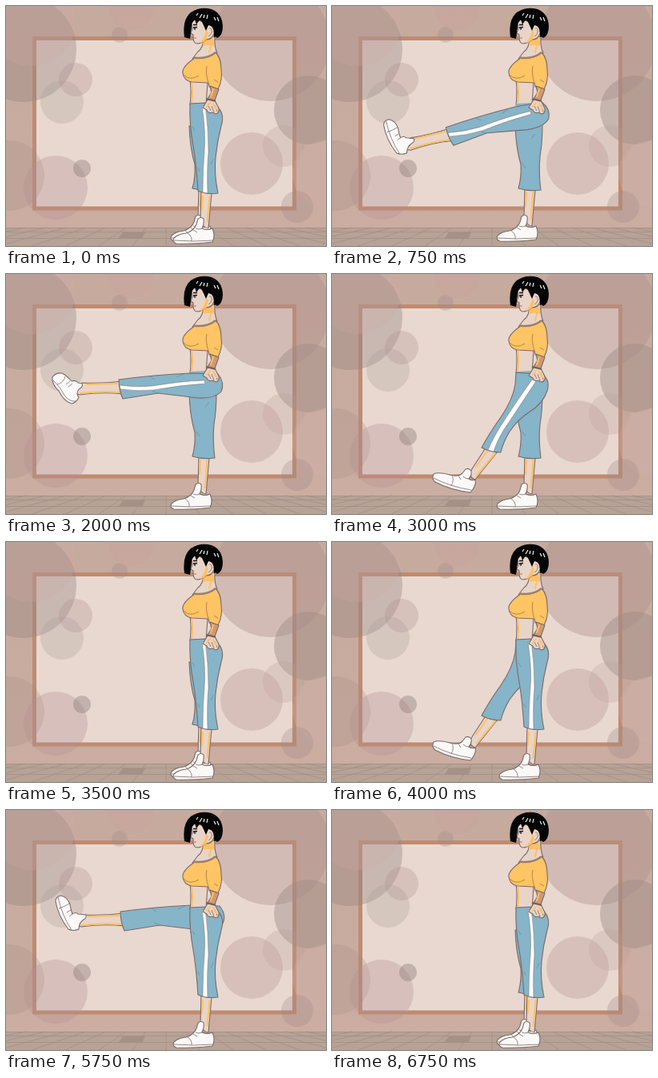
Recreate the animation shown at these times as an HTML page. Size 400 by 300 pixels, loop 7000 ms.

```html
<!DOCTYPE html>
<html lang="en">
<head>
<meta charset="utf-8">
<title>Standing leg raise</title>
<style>
html, body { margin: 0; width: 100%; height: 100%; overflow: hidden; background: #c6aa9f; }
svg { display: block; width: 100vw; height: 100vh; }
.line { stroke: #7b6a65; stroke-width: 1.1; stroke-linejoin: round; stroke-linecap: round; }
.pants { fill: #86b4c8; }
.skin { fill: #e9d4c8; }
.shoe { fill: #fbf9f8; }
.shade { fill: none; stroke: #ffc066; stroke-width: 2; stroke-linecap: round; }
.tint { fill: #ffc066; }
.thin { fill: none; stroke: #7b6a65; stroke-width: .8; }
.stripe { fill: #fff; stroke: #7b6a65; stroke-width: .5; }
.crease { fill: none; stroke: #6a92a4; stroke-width: .8; }
</style>
</head>
<body>
<svg viewBox="0 0 400 300" preserveAspectRatio="none">
  <defs>
    <linearGradient id="wall" x1="0" y1="0" x2="0" y2="1">
      <stop offset="0" stop-color="#c6aa9e"/>
      <stop offset="1" stop-color="#cbada1"/>
    </linearGradient>

    <g id="shoeFlat">
      <path class="shoe line" d="M237 263Q241 260 244 263Q245 269 242 275Q249 278 255 275Q259 284 255 292Q230 295 210 294Q204 292 207 287Q212 282 222 281Q232 278 235 270Z"/>
      <path class="thin" d="M207 290Q230 292 256 290M224 281Q230 285 229 291M242 275Q238 277 234 275M231 277L236 280"/>
    </g>

    <g id="shoeLow">
      <path class="shoe line" d="M167 244Q171 242 174 246Q175 252 171 256Q175 259 179 257Q181 264 173 273Q148 270 129 260Q124 256 127 250Q133 247 147 251Q158 254 163 249Z"/>
      <path class="thin" d="M127 255Q148 266 174 270M150 251Q153 258 149 265M171 256Q167 256 164 253M158 252L161 257"/>
    </g>

    <g id="lowLeg">
      <path class="skin line" d="M193 216L176 242L172 249Q174 256 179 257L207 222Z"/>
      <path class="shade" d="M204 224L181 252M194 221L180 241"/>
      <use href="#shoeLow"/>
      <path class="pants line" d="M230 123L229 138Q226 157 211 179Q196 200 187 217Q198 223 211 223Q214 210 222 197Q232 182 246 173Q264 162 269 146Q273 134 264 126Z"/>
    </g>
    <path id="lowStripe" class="stripe" d="M250 132Q232 157 216 182Q202 203 195 220L202 222Q208 203 222 184Q239 158 255 134Z"/>

    <g id="upLeg">
      <path class="skin line" d="M145 134Q122 137 95 136L84 148L92 151Q120 147 146 150Z"/>
      <path class="shade" d="M143 148Q120 146 93 149M139 137L101 138"/>
      <path class="pants line" d="M231 124Q185 126 141 132Q141 145 146 156Q165 153 190 149Q216 152 240 155Q261 156 269 147Q274 136 265 125Z"/>
      <path class="crease" d="M180 128L186 132M190 149L183 146M222 125L213 129"/>
    </g>
    <path id="upStripe" class="stripe" d="M142 139Q162 142 183 140Q218 134 248 133L249 137Q216 139 185 145Q163 147 143 144Z"/>

    <g id="shoeFlex">
      <path class="shoe line" d="M81 135Q85 132 88 135L98 136Q99 140 95 142Q89 146 89 154Q82 157 76 154Q63 137 60 119Q60 113 67 112Q75 114 78 123Q79 130 81 135Z"/>
      <path class="thin" d="M63 114Q68 137 80 155M64 128Q71 126 77 122M79 130L74 133M81 135L77 138"/>
    </g>

    <g id="shoePoint">
      <path class="shoe line" d="M82 134Q87 132 90 136L95 137Q97 141 91 144Q87 149 91 154Q88 161 82 162Q72 159 66 146Q57 138 58 129Q62 123 70 124Q76 127 82 134Z"/>
      <path class="thin" d="M59 133Q68 141 74 153Q80 160 88 159M64 138Q72 136 74 128M80 134L75 138M83 137L78 141"/>
    </g>
  </defs>

  <rect width="400" height="300" fill="url(#wall)"/>
  <rect x="35.500" y="40.500" width="325" height="212.500" fill="#e8d8d0" stroke="#c08b70" stroke-width="5"/>
  <g fill="#a08884" fill-opacity=".3">
    <circle cx="22" cy="54" r="66" fill="#94857e" fill-opacity=".38"/>
    <circle cx="32" cy="20" r="55" fill="#cfa9a5" fill-opacity=".25"/>
    <circle cx="87" cy="92" r="21" fill="#b08c8a"/>
    <circle cx="70" cy="120" r="27" fill="#a89b94"/>
    <circle cx="4" cy="212" r="44" fill-opacity=".25"/>
    <circle cx="62" cy="227" r="40" fill="#b38f8f" fill-opacity=".33"/>
    <circle cx="95" cy="203" r="11" fill="#8d7775" fill-opacity=".4"/>
    <circle cx="331" cy="45" r="74" fill="#ad9089" fill-opacity=".4"/>
    <circle cx="378" cy="130" r="43" fill="#9c8a82" fill-opacity=".43"/>
    <circle cx="347" cy="175" r="26" fill="#b49a94" fill-opacity=".25"/>
    <circle cx="307" cy="197" r="39" fill="#bf9c99" fill-opacity=".4"/>
    <circle cx="400" cy="210" r="42" fill="#cfb0a8"/>
    <circle cx="364" cy="251" r="20"/>
    <circle cx="142" cy="36" r="10"/>
    <circle cx="156" cy="3" r="28" fill="#c9a39c" fill-opacity=".4"/>
  </g>

  <rect y="277" width="400" height="23" fill="#b7a296"/>
  <path d="M140 291L146 283H174L170 291Z" fill="#a69187"/>
  <path id="floor" fill="none" stroke="#a18d83" stroke-width=".7"/>

  <g id="farUp"></g>
  <g id="farStand">
    <path class="skin line" d="M241 226L240 264Q242 274 250 275L254 230Z"/>
    <path class="shade" d="M251.500 233L248.500 267M243 233L242 250"/>
    <use href="#shoeFlat"/>
    <path class="pants line" d="M229 150Q230 178 236 198Q237 214 233 228Q246 232 261 230Q258 207 260 188Q263 170 263 148Z"/>
    <path class="crease" d="M238 197L242 203M254 160L249 166"/>
  </g>

  <path class="skin line" d="M230 92Q232 107 230 124L250 124L252 95Z"/>
  <path class="shade" d="M232 97Q234 107 232 120"/>
  <path class="pants" d="M230 122L250 121L266 126Q272 137 264 150L230 153Z"/>

  <g id="nearStand">
    <path class="skin line" d="M244 228L243 267Q245 277 253 278L257 234Z"/>
    <path class="shade" d="M254.500 238L251.500 270M246 238L245 254"/>
    <use href="#shoeFlat" x="3" y="3"/>
    <path class="pants line" d="M230 122Q229 148 234 175Q238 199 240 231Q251 236 265 234Q260 211 262 189Q264 169 269 150Q274 135 264 126L250 121Z"/>
    <path class="stripe" d="M245 125Q250 158 248 182Q246 205 246 233L252 234Q251 204 253 182Q253 151 249 124Z"/>
    <path class="crease" d="M233 151L236 156M240 202L242 207M259 191L256 198"/>
  </g>
  <g id="nearUp"></g>

  <path class="skin line" d="M246 42Q247 52 240 57L233 66Q250 69 264 59Q260 50 261 38Z"/>
  <path class="tint" d="M246 42L259 37L260 50Q252 48 247 50Z"/>
  <path class="shade" stroke-width="1.500" d="M256 50L254 58"/>
  <path class="line" fill="#ffc463" d="M236 65C227 71 220 78 221 84C222 91 227 94 232 95L253 96L254 101L265 104Q271 92 269 80Q269 65 262 58Q251 67 236 65Z"/>
  <path fill="none" stroke="#9b7f70" stroke-width="2.400" d="M235 64.500Q251 67 262 58"/>
  <path fill="none" stroke="#b88548" d="M222 86Q230 94 241 87M253 96Q249 84 251 75M260 92L265 95"/>
  <path class="line" fill="#cf9a72" d="M255 100L266 104L261 118L252 116L257 108Z"/>
  <path class="shade" d="M259 104L256 113"/>
  <path class="skin line" d="M252 117L261 118L266 128Q267 134 262 135L258 133Q253 135 251 130L246 127Z"/>
  <path class="thin" d="M257 125L260 133M261 124L264 132M253 125L256 131"/>
  <path class="shade" d="M255 121L251 126M259 122L263 129"/>
  <path fill="none" stroke="#7b6158" stroke-width="2.200" d="M250 116L262 119"/>

  <path fill="#050505" d="M223 39Q220 17 231 8Q243 0 257 4Q270 9 271 25Q271 37 264 40L252 30L232 24L230 41Z"/>
  <path class="skin line" d="M232 18L233 28L231 34L234 36L234 41Q235 47 239 47Q244 47 250 42Q258 42 260 34Q261 26 255 23L238 17Z"/>
  <path class="tint" d="M250 30Q249 39 242 46Q247 46 251 41L253 33Z"/>
  <path class="thin" d="M254 28Q258 27 257 33Q256 37 253 38"/>
  <path fill="#050505" d="M232 8L224 39L230 40L232 22L236 17L238 23L243 16Q247 24 250 31L253 24Q261 25 260 39L266 37L268 14L250 5Z"/>
  <path fill="none" stroke="#111" stroke-width="1.400" d="M234 27L239 26.500M234 23.500L239 23.500"/>
  <circle cx="236" cy="28.500" r="1.300" fill="#33425a"/>
  <path fill="none" stroke="#b86f66" d="M234 40L238 40"/>
  <path fill="none" stroke="#eef3f6" stroke-width="1.200" d="M238 12L240 9M242 15L245 10M247 15L248 11M251 16L252 11M260 14L262 18M264 14L266 19"/>
</svg>
<script>
const $ = id => document.getElementById(id);
const show = (el, on) => { el.style.display = on ? '' : 'none'; };
const STEP = 250;

// s standing, l low, m middle, h high, f toes flexed, p toes pointed
const NEAR = 'slmhfpfppfhmls', FAR = 'sslmhfpfpfhmls';
const POSES = NEAR + FAR;
const SHAPES = {
  l: ['low', 0], m: ['low', 24], h: ['up', -11.5, 'flex'],
  f: ['up', 0, 'flex'], p: ['up', 0, 'point']
};

// Floorboards receding towards the back wall
let boards = 'M0 277.500H400M0 282.500H400M0 290.500H400';
for (let i = -10; i <= 10; i++) boards += `M${200 + i * 25} 277L${200 + i * 42} 300`;
$('floor').setAttribute('d', boards);

// Fill a group with the parts of a raised leg; only the near one has stripes
function makeLeg(id, striped) {
  const g = $(id);
  const use = ref => `<use href="#${ref}"/>`;
  const part = name => `<g>${use(name + 'Leg')}${striped ? use(name + 'Stripe') : ''}</g>`;
  g.innerHTML = part('low') + part('up') + use('shoeFlex') + use('shoePoint');
  const [low, up, flex, point] = g.children;
  return { g, low, up, flex, point };
}
const near = makeLeg('nearUp', true), far = makeLeg('farUp', false);

function setLeg(leg, pose) {
  show(leg.g, pose !== 's');
  if (pose === 's') return;
  const [shape, turn, foot] = SHAPES[pose];
  for (const name of ['low', 'up']) show(leg[name], name === shape);
  for (const name of ['flex', 'point']) show(leg[name], name === foot);
  const shift = leg === far && shape === 'up' ? 'translate(2 -5) ' : '';
  leg.g.setAttribute('transform', `${shift}rotate(${turn} 240 135)`);
  // The flexed foot stays upright while the leg turns
  leg.flex.setAttribute('transform', `rotate(${-turn} 90 143)`);
}

const start = performance.now();
let last = -1;
function draw() {
  const i = Math.floor((performance.now() - start) / STEP) % POSES.length;
  if (i !== last) {
    const pose = POSES[i], nearMoves = i < NEAR.length;
    setLeg(near, nearMoves ? pose : 's');
    setLeg(far, nearMoves ? 's' : pose);
    show($('nearStand'), !nearMoves || pose === 's');
    show($('farStand'), nearMoves || pose === 's');
    last = i;
  }
  requestAnimationFrame(draw);
}
draw();
</script>
</body>
</html>
```
